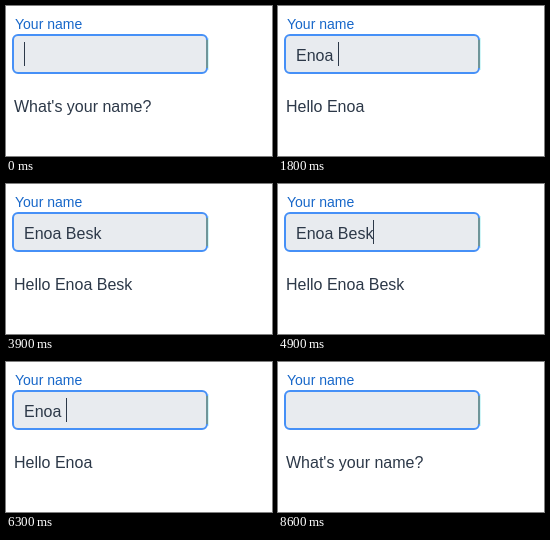
Write an HTML page that moves like this. It is 266 by 150 pixels and loops after 9 s.

```html
<!DOCTYPE html>
<html lang="en">
<head>
<meta charset="utf-8">
<title>Greeting field</title>
<style>
  html, body { margin: 0; width: 100%; height: 100%; overflow: hidden; background: #fff; }
  svg { display: block; }
  text { font: 16px "Liberation Sans", Arial, sans-serif; fill: #2c3848; white-space: pre; }
  #label { font-size: 14px; fill: #1767c9; }
</style>
</head>
<body>
<svg width="266" height="150" viewBox="0 0 266 150">
  <text id="label" x="9" y="23">Your name</text>
  <rect x="7" y="29" width="194" height="38" rx="5" fill="#e8ebef" stroke="#4690f7" stroke-width="2"/>
  <path d="M201 34V62" stroke="#6f9599" stroke-width="2"/>
  <path d="M202.5 32V64" stroke="#d0f6f8"/>
  <text id="input" x="18" y="55"></text>
  <rect id="caret" y="36" width="1" height="24" fill="#2c3848"/>
  <text id="message" x="8" y="106"></text>
</svg>
<script>
const LOOP = 9000, TICK = 100, LATENCY = 25;
const NAME = "Enoa Besk";
const $ = id => document.getElementById(id);
const input = $("input"), caret = $("caret"), message = $("message");

// Typing comes in bursts at a steady pace; erasing slowly speeds up.
const burst = (start, text) => [...text].map((_, i) => start + 265 * i);
const typed = [...burst(390, "Enoa "), ...burst(2150, "Be"), ...burst(3120, "sk")];
const erased = [...NAME].map((_, i) => 5300 + i * (355 - 10 * i));

// Pauses in which the caret is blinked off.
const hidden = [[100, 400], [1300, 1800], [3700, 4900], [8600, LOOP]];

function nameAt(t) {
  const count = keys => keys.filter(key => key <= t).length;
  return NAME.slice(0, count(typed) - count(erased));
}

function setText(el, value) {
  if (el.textContent !== value) el.textContent = value;
}

function draw(now) {
  const t = Math.floor(now % LOOP / TICK) * TICK;
  const value = nameAt(t), greeted = nameAt(t - LATENCY);
  setText(input, value);
  setText(message, greeted ? "Hello " + greeted : "What's your name?");
  const width = value ? input.getComputedTextLength() : 0;
  caret.setAttribute("x", Math.round(18 + width));
  const off = hidden.some(([from, to]) => t >= from && t < to);
  caret.setAttribute("visibility", off ? "hidden" : "visible");
}

let start;
function frame(now) {
  start ??= now;
  draw(now - start);
  requestAnimationFrame(frame);
}
draw(0);
requestAnimationFrame(frame);
</script>
</body>
</html>
```
